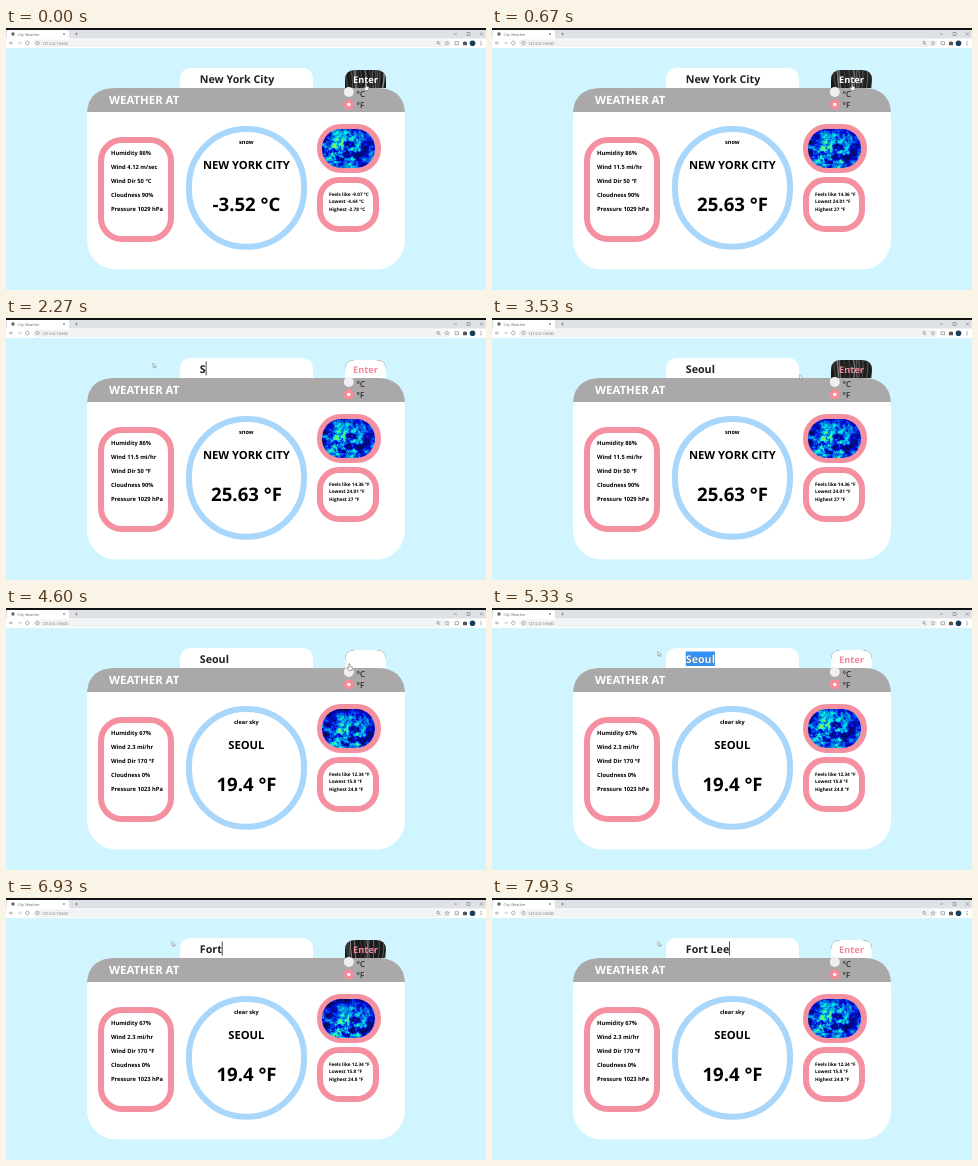
An HTML page with a canvas for the animation above (8 s loop, 480 by 262 pixels).

```html
<!DOCTYPE html>
<html lang="en">
<head>
<meta charset="utf-8">
<title>City Weather</title>
<style>
  html, body { margin: 0; width: 100%; height: 100%; overflow: hidden; background: #d0f5ff; }
  svg, canvas { position: absolute; display: block; }
  svg { left: 0; top: 0; }
  #radar { left: 316px; top: 101px; width: 53px; height: 39px; border-radius: 19px; }
  text { font-family: "Open Sans", "Noto Sans", sans-serif; font-weight: 700; fill: #000;
         text-rendering: geometricPrecision; white-space: pre; }
  .mid { text-anchor: middle; }
  .ui { font-weight: 400; fill: #666; }
  .icon { fill: none; stroke: #777; stroke-width: .6; }
  .ring { fill: #fff; stroke: #f590a0; stroke-width: 6; }
</style>
</head>
<body>
<svg id="stage" width="480" height="262" viewBox="0 0 480 262">
  <defs>
    <clipPath id="buttonShape"><path d="M339 60V52q0-10 10-10h21q10 0 10 10v8z"/></clipPath>
    <clipPath id="selectedArea"><rect id="selectedClip" y="43" height="15"/></clipPath>
    <linearGradient id="softEdge">
      <stop offset="0" stop-color="#fff" stop-opacity="0"/>
      <stop offset=".2" stop-color="#fff"/>
    </linearGradient>
    <radialGradient id="softSpot">
      <stop offset=".3" stop-color="#eee"/>
      <stop offset="1" stop-color="#eee" stop-opacity="0"/>
    </radialGradient>
  </defs>

  <rect width="480" height="262" fill="#d0f5ff"/>
  <rect width="480" height="11" fill="#dee1e6"/>
  <rect width="480" height="2" fill="#111"/>
  <path d="M1 11V4q0-2 2-2h58q2 0 2 2v7z" fill="#fff"/>
  <rect y="10.5" width="480" height="9.5" fill="#fff"/>
  <rect x="27" y="11.5" width="418" height="7.5" rx="3.7" fill="#f1f3f4"/>
  <circle cx="7" cy="6" r="1.7" fill="#666"/>
  <text class="ui" x="11.5" y="7.5" font-size="3.7">City Weather</text>
  <text class="ui" x="36" y="16.6" font-size="3.8">127.0.0.1:5500</text>
  <g class="icon">
    <path d="M57 5l2 2m0-2l-2 2M69 6h3m-1.5-1.5v3M448 6h3M461 4.5h3v3h-3zM474 4.5l3 3m0-3l-3 3"/>
    <path d="M7 15H3.5l1.6-1.6M3.5 15l1.6 1.6"/>
    <path d="M12 15h3.5l-1.6-1.6m1.6 1.6l-1.6 1.6" stroke="#bbb"/>
    <path d="M23 14.2a1.8 1.8 0 1 0 0 1.6v-1.6"/>
    <circle cx="31.5" cy="15" r="1.6"/>
    <circle cx="432" cy="14.7" r="1.3"/><path d="M433 15.7l1.4 1.4"/>
    <path d="M441 13l.6 1.4 1.5.1-1.2 1 .4 1.5-1.3-.8-1.3.8.4-1.5-1.2-1 1.500-.1z" stroke-width=".4"/>
    <path d="M449 13.700h3.500v3h-3.500z"/>
  </g>
  <path d="M457 14h1.200a.8.8 0 0 1 1.600 0H461v3.200h-4z" fill="#555"/>
  <circle cx="466.500" cy="15.200" r="2.800" fill="#173f5c"/>
  <path d="M475 13.300v4" stroke="#666" stroke-dasharray=".8 .8"/>

  <path d="M174 61V52q0-12 12-12h109q12 0 12 12v9z" fill="#fff"/>
  <rect x="81" y="60" width="318" height="181.500" rx="29" fill="#fff"/>
  <path d="M81 84q2-24 28-24h262q26 0 28 24z" fill="#aaa8a9"/>
  <text x="103" y="76.300" font-size="11.400" style="fill:#fff">WEATHER AT</text>

  <rect id="selection" y="43.500" height="14.500" fill="#3390f5"/>
  <text id="city" x="193.800" y="54.500" font-size="10.700" style="fill:#222"></text>
  <text id="citySelected" x="193.800" y="54.500" font-size="10.700" style="fill:#fff" clip-path="url(#selectedArea)"></text>
  <rect id="caret" y="43.500" width=".8" height="14" fill="#222"/>

  <g clip-path="url(#buttonShape)">
    <rect x="339" y="42" width="41" height="18" fill="#1c1c1c"/>
    <g id="streaks" fill="none"></g>
    <ellipse id="glow" cx="364" cy="48" rx="23" ry="14" fill="url(#softSpot)"/>
    <rect id="flash" y="42" width="70" height="18" fill="url(#softEdge)"/>
  </g>
  <text id="enter" class="mid" x="359.500" y="54.700" font-size="9.200">Enter</text>

  <circle cx="342.800" cy="64" r="5" fill="#f0eef0"/>
  <circle cx="342.800" cy="76.500" r="5" fill="#f98b98"/>
  <circle cx="342.800" cy="76.500" r="1.700" fill="#fff"/>
  <text x="350.600" y="68.700" font-size="8" style="font-weight:400">°C</text>
  <text x="350.600" y="80.400" font-size="8" style="font-weight:400">°F</text>

  <rect class="ring" x="95" y="112" width="70" height="99" rx="21"/>
  <rect class="ring" x="183" y="101" width="115" height="117.700" rx="57" style="stroke:#a9d6fb"/>
  <rect class="ring" x="314" y="99" width="58" height="43" rx="21"/>
  <rect class="ring" x="314" y="152" width="56" height="49" rx="19"/>
  <g id="report"></g>
  <g id="pointer"></g>
</svg>
<canvas id="radar" width="53" height="39"></canvas>

<script>
const LOOP = 8000, CLIP = 2830, TEXT_X = 193.8;
const $ = id => document.getElementById(id);
const clamp = (v, lo = 0, hi = 1) => Math.min(hi, Math.max(lo, v));
const set = (el, attrs) => { for (const k in attrs) el.setAttribute(k, attrs[k]); };
const latest = (steps, t) => steps.filter(s => s[0] <= t).pop();

const reports = [
  [0, 'Humidity 86%|Wind 4.12 m/sec|Wind Dir 50 °C|Cloudness 90%|Pressure 1029 hPa|snow|NEW YORK CITY|-3.52 °C|Feels like -9.07 °C|Lowest -4.44 °C|Highest -2.78 °C'],
  [450, 'Humidity 86%|Wind 11.5 mi/hr|Wind Dir 50 °F|Cloudness 90%|Pressure 1029 hPa|snow|NEW YORK CITY|25.63 °F|Feels like 14.36 °F|Lowest 24.01 °F|Highest 27 °F'],
  [4200, 'Humidity 67%|Wind 2.3 mi/hr|Wind Dir 170 °F|Cloudness 0%|Pressure 1023 hPa|clear sky|SEOUL|19.4 °F|Feels like 12.34 °F|Lowest 15.8 °F|Highest 24.8 °F']
];

const typed = [[0, 'New York City']];
const type = (word, times) => times.forEach((t, i) => typed.push([t, word.slice(0, i + 1)]));
type('Seoul', [2200, 2330, 2470, 2600, 2750]);
type('Fort Lee', [6450, 6600, 6750, 6900, 7100, 7300, 7500, 7750]);

// Pointer path: time, x, y
const path = [
  [0, 360, 56], [800, 360, 56], [1200, 288, 53], [1350, 288, 53], [1700, 147, 45],
  [3260, 147, 45], [3530, 307.5, 57], [3750, 358, 55], [4400, 358, 55], [4600, 344, 56],
  [4740, 245, 50], [4930, 150, 45], [5200, 166, 43.5], [LOOP, 166, 43.5]
];
// Each drag: start, end, time the selection is typed over
const drags = [[1350, 1700, 2200], [4740, 4930, 6450]];
const focus = [[1280, 3700], [4740, LOOP]];

function pointerAt(t) {
  const i = path.findIndex(p => p[0] > t), a = path[i - 1], b = path[i];
  const k = (t - a[0]) / (b[0] - a[0]);
  return [a[1] + (b[1] - a[1]) * k, a[2] + (b[2] - a[2]) * k];
}

const cursors = {
  arrow: '<path d="M0 0v4.500l1.100-.9.800 1.600.7-.4-.7-1.500h1.400z" fill="#fff" stroke="#555" stroke-width=".4"/>',
  beam: '<path d="M-1-2.500H1M0-2.500v5M-1 2.500H1" stroke="#555" stroke-width=".6"/>',
  hand: '<path d="M-.6 0q.7-.8 1.300 0v2.300l2.300.7-.3 3.500h-3.200l-2-2.600.7-.6 1.200.8z" fill="#fff" stroke="#555" stroke-width=".5"/>'
};

const lines = [];
function addLine(x, y, size, cls = '') {
  const el = document.createElementNS('http://www.w3.org/2000/svg', 'text');
  set(el, { x, y, 'font-size': size, class: cls });
  $('report').append(el);
  lines.push(el);
}
for (let i = 0; i < 5; i++) addLine(105, 127 + i * 14, 5.75);
addLine(240.3, 116.2, 5.6, 'mid');
addLine(240.3, 141, 11.2, 'mid');
addLine(240.5, 183, 18.6, 'mid');
for (let i = 0; i < 3; i++) addLine(323, 167.5 + i * 7.8, 4.7);

const hash = (x, y) => {
  const s = Math.sin(x * 127.1 + y * 311.7) * 43758.5453;
  return s - Math.floor(s);
};
function noise(x, y) {
  const ix = Math.floor(x), iy = Math.floor(y);
  const ease = f => f * f * (3 - 2 * f), u = ease(x - ix), v = ease(y - iy);
  const row = j => hash(ix, j) + (hash(ix + 1, j) - hash(ix, j)) * u;
  return row(iy) + (row(iy + 1) - row(iy)) * v;
}

const ctx = $('radar').getContext('2d');
const image = ctx.createImageData(53, 39);
// Storm cells in a rainbow scale over a navy sea
function drawRadar(phase) {
  const swing = .5 - .5 * Math.cos(phase * 2 * Math.PI);
  const cx = 17 + swing * 6, cy = 19 + swing * 9, drift = swing * 6;
  const level = (v, peak) => 225 * clamp(1.5 - Math.abs(4 * v - peak));
  for (let y = 0, i = 0; y < 39; y++) for (let x = 0; x < 53; x++, i += 4) {
    const storm = Math.exp(-(((x - cx) / 18) ** 2 + ((y - cy) / 14) ** 2));
    const sx = x - drift, sy = y - drift;
    const cells = noise(sx / 6, sy / 5) * .5 + noise(sx / 2.5, sy / 2.5) * .3 + noise(sx / 1.2, sy / 1.2) * .2;
    const v = clamp(.06 + storm * .22 + (cells - .45) * (.6 + storm * .8), -.02, .92);
    image.data.set([level(v, 3), level(v, 2) + 12, level(v, 1), 255], i);
  }
  ctx.putImageData(image, 0, 0);
}

function drawButton(phase, hover) {
  const ms = phase * CLIP;
  let strokes = '';
  for (let i = 0; i < 13; i++) {
    const x = 340 + i * 3.2 + 2 * Math.sin(phase * 6.283 + i);
    const tone = Math.round(45 + 110 * hash(i, 3));
    strokes += `<path d="M${x} 41q${3 - 6 * hash(i, 5)} 8 ${2 - i / 4} 20" stroke="rgb(${tone},${tone},${tone})" stroke-width="${.5 + hash(i, 8)}"/>`;
  }
  $('streaks').innerHTML = strokes;
  set($('glow'), { opacity: .9 * Math.exp(-(((ms - 410) / 150) ** 2)) });
  set($('flash'), { x: ms > 2760 ? 381 : 381 - 56 * clamp((ms - 1480) / 300) });
  $('enter').style.fill = hover ? '#fff' : '#f28a9c';
}

function drawInput(t, px) {
  const [since, text] = latest(typed, t);
  $('city').textContent = $('citySelected').textContent = text;
  const end = TEXT_X + $('city').getComputedTextLength();
  const drag = drags.find(d => t >= d[0] && t < d[2]);
  const start = drag ? clamp(t < drag[1] ? px : 0, TEXT_X, end) : end;
  for (const el of [$('selection'), $('selectedClip')]) set(el, { x: start, width: end - start });
  const focused = focus.find(f => t >= f[0] && t < f[1]);
  const lit = focused && (t - Math.max(since, focused[0])) % 1060 < 530;
  set($('caret'), { x: end, opacity: lit && end - start < 1 ? 1 : 0 });
}

function draw(t) {
  const phase = t % CLIP / CLIP, [px, py] = pointerAt(t);
  const inside = (x0, x1, y0) => px > x0 && px < x1 && py > y0 && py < 60;
  const hover = inside(339, 380, 42);
  latest(reports, t)[1].split('|').forEach((s, i) => { lines[i].textContent = s; });
  drawInput(t, px);
  drawButton(phase, hover);
  drawRadar(phase);
  $('pointer').innerHTML = cursors[hover ? 'hand' : inside(174, 307, 40) ? 'beam' : 'arrow'];
  set($('pointer'), { transform: `translate(${px} ${py})` });
}

const began = performance.now();
function tick() {
  draw((performance.now() - began) % LOOP);
  requestAnimationFrame(tick);
}
tick();
</script>
</body>
</html>
```
